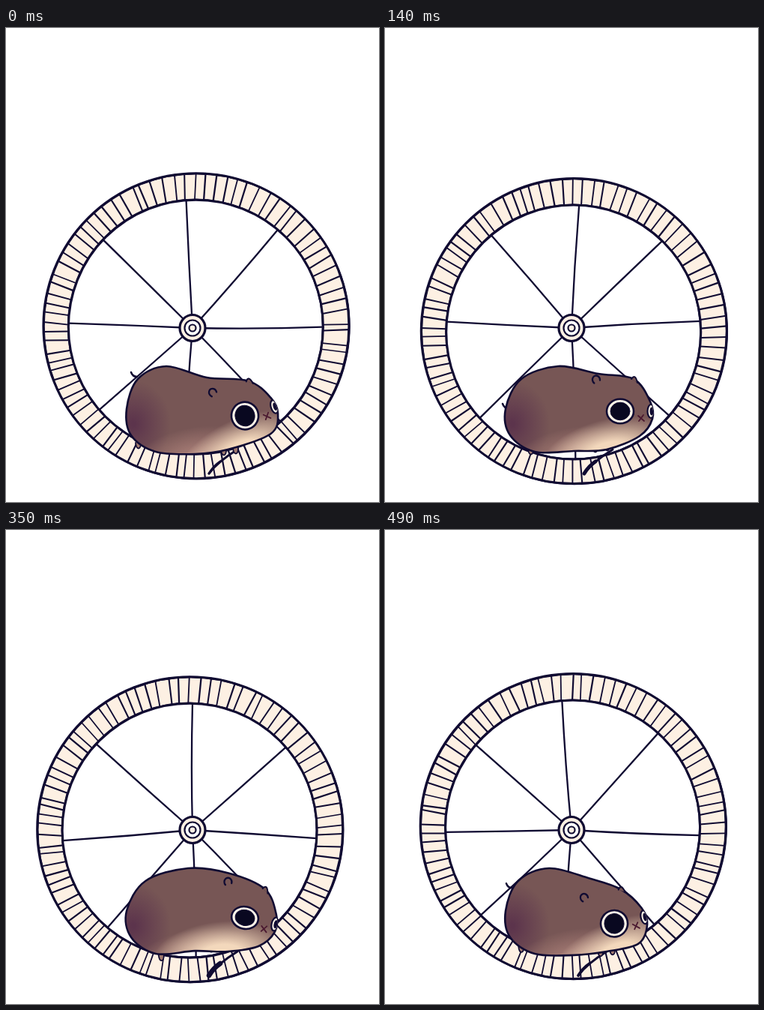
An HTML page with a canvas for the animation above (0.56 s loop, 498 px wide and 632 px high).

```html
<!DOCTYPE html>
<html lang="en">
<head>
<meta charset="utf-8">
<title>Hamster wheel</title>
<style>
  html, body { margin: 0; width: 100%; height: 100%; overflow: hidden; background: #fff; }
  canvas { display: block; }
</style>
</head>
<body>
<canvas id="stage" width="498" height="632"></canvas>
<script>
const ctx = document.getElementById('stage').getContext('2d');
const INK = '#100b32', CREAM = '#fdf0e3', EYE_WHITE = '#fff6e8', FUR = '#775655';
const STEP = 70, STEPS = 8, SLATS = 90, TAU = Math.PI * 2, DEG = Math.PI / 180;

const noise = n => { const s = Math.sin(n * 12.9898) * 43758.5453; return s - Math.floor(s) - .5; };
const onRing = ([cx, cy, rx, ry], a) => [cx + rx * Math.cos(a), cy + ry * Math.sin(a)];

function paint(fill, stroke, width = 2) {
  if (fill) { ctx.fillStyle = fill; ctx.fill(); }
  if (stroke) { ctx.strokeStyle = stroke; ctx.lineWidth = width; ctx.stroke(); }
}
function oval(x, y, rx, ry, turn, fill, stroke, width) {
  ctx.beginPath();
  ctx.ellipse(x, y, rx, ry, turn, 0, TAU);
  paint(fill, stroke, width);
}
function curve(x1, y1, cx, cy, x2, y2, width = 2) {
  ctx.beginPath();
  ctx.moveTo(x1, y1);
  ctx.quadraticCurveTo(cx, cy, x2, y2);
  paint(null, INK, width);
}
function glow(x, y, rx, ry, turn, rgb, solid) {
  ctx.save();
  ctx.translate(x, y);
  ctx.rotate(turn);
  ctx.scale(rx, ry);
  const fade = ctx.createRadialGradient(0, 0, 0, 0, 0, 1);
  fade.addColorStop(solid, `rgb(${rgb})`);
  fade.addColorStop(1, `rgba(${rgb},0)`);
  oval(0, 0, 1, 1, 0, fade);
  ctx.restore();
}
// Closed smooth curve through the points.
function blob(points) {
  const n = points.length, at = i => points[(i + n) % n];
  const path = new Path2D();
  path.moveTo(...at(0));
  for (let i = 0; i < n; i++) {
    const [p, q, r, s] = [at(i - 1), at(i), at(i + 1), at(i + 2)];
    path.bezierCurveTo(q[0] + (r[0] - p[0]) / 6, q[1] + (r[1] - p[1]) / 6,
      r[0] - (s[0] - q[0]) / 6, r[1] - (s[1] - q[1]) / 6, ...r);
  }
  path.closePath();
  return path;
}

// The wheel wobbles once per loop while every spoke sways in its own phase.
function drawWheel(step, phase) {
  const cx = 250 + 4.5 * Math.cos(phase - 30 * DEG);
  const cy = 400 + 5 * Math.cos(phase - 125 * DEG);
  const outer = [cx, cy, 204, 203.5], inner = [cx - .5, cy + 1.5, 170, 169.5];

  oval(...outer, 0, CREAM, INK, 3);
  oval(cx + .6, cy + .5, 204, 203.5, 0, null, INK, 2.4);
  for (let i = 0; i < SLATS; i++) {
    const seed = i + step * 101;
    const a = (i + noise(seed) * .4) / SLATS * TAU + .06 * Math.sin(i / SLATS * TAU + .8);
    const [x1, y1] = onRing(inner, a), [x2, y2] = onRing(outer, a + noise(seed + .5) * .02);
    curve(x1, y1, (x1 + x2) / 2, (y1 + y2) / 2, x2, y2, 2 + noise(seed + .3) * .6);
  }
  oval(...inner, 0, '#fff', INK, 3);
  oval(inner[0] - .5, inner[1] - .5, 170, 169.5, 0, null, INK, 2.2);

  const hx = 249, hy = 400;
  for (let i = 0; i < 8; i++) {
    const sway = 5 * Math.cos(phase + (90 - 40 * i) * DEG);
    const [x, y] = onRing(inner, (45 * i + sway) * DEG);
    const bend = noise(i + step * 7) * .03;
    curve(hx, hy, (hx + x) / 2 + (y - hy) * bend, (hy + y) / 2 - (x - hx) * bend, x, y, 2.3);
  }
  oval(hx, hy, 17, 17.5, 0, CREAM, INK, 3.2);
  oval(hx, hy, 10.5, 10.5, 0, '#fff', INK, 2.2);
  oval(hx, hy, 4.5, 4.5, 0, CREAM, INK, 2.2);
}

// Two lunges per loop, the second shorter: the head falls back, bobbing up midway.
function headPose(step, reach) {
  const first = step < 5;
  const b = first ? step / 4 : (step - 5) / 2, size = first ? 1 : .65;
  return {
    x: 319 - 20 * size * b * b,
    y: 517 + size * (12 * b * b - 36 * b * (1 - b)),
    pitch: -17 * DEG * reach
  };
}

// reach runs from 1 (stretched) to -1 (crouched).
function bodyOutline(head, reach) {
  const c = Math.cos(head.pitch), s = Math.sin(head.pitch);
  const face = [[18, -43], [40, -13], [43, 10], [26, 33]]
    .map(([x, y]) => [head.x + x * c - y * s, head.y + x * s + y * c]);
  return blob([
    [231 - 17 * reach, 451], [285 - 17 * reach, 461 + 5 * reach],
    ...face,
    [296, 562], [252, 564 + 4 * reach], [200, 565], [167, 543], [161, 508], [182 - 6 * reach, 468]
  ]);
}

function drawLimbs(head, reach) {
  const hand = head.x - 48, elbow = head.x - 10;
  curve(hand, 594, head.x - 36, 578, elbow, 562, 3);
  curve(hand, 594, head.x - 42, 584, head.x - 33, 578, 5 - 2 * reach);

  const foreX = 281 + 10 * reach, foreY = 562 + 4 * reach;
  for (const [x, y] of [[195 - 18 * reach, 565 - 8 * reach], [foreX, foreY], [foreX + 16, foreY - 2]]) {
    ctx.beginPath();
    ctx.moveTo(x - 4, y - 4);
    ctx.bezierCurveTo(x - 3, y + 6, x + 3, y + 6, x + 3, y - 4);
    paint('#a07a70', INK, 1.8);
  }
  const tx = 160 + 10 * reach * reach, ty = 504 - 42 * reach;
  curve(tx - 3, ty - 3, tx - 1, ty + 3, tx + 5, ty + 3, 2.5);
}

function drawBody(outline, reach) {
  ctx.save();
  ctx.clip(outline);
  ctx.fillStyle = FUR;
  ctx.fill(outline);
  glow(170, 528, 50, 58, 0, '92,52,76', .05);
  glow(255, 572, 85, 40, -.15, '176,132,124', 0);
  glow(298 + 15 * reach, 566, 92, 44, -.25 - .2 * reach, '243,216,188', .3);
  ctx.restore();
  ctx.strokeStyle = INK;
  ctx.lineWidth = 2.6;
  ctx.stroke(outline);
}

function drawFace(head, outline, reach) {
  const place = () => { ctx.translate(head.x, head.y); ctx.rotate(head.pitch); };

  ctx.save();
  ctx.clip(outline);
  place();
  oval(41, 0, 4.5, 9, 0, EYE_WHITE, INK, 2.2);
  oval(42, 0, 2.5, 5.5, 0, INK);
  ctx.restore();

  ctx.save();
  place();
  const open = 16.3 + 2 * reach;
  oval(0, 0, 18, open, 0, EYE_WHITE, INK, 2.6);
  oval(0, 0, 13, open - 4.5, 0, '#090820', INK, 1);

  ctx.beginPath();
  ctx.moveTo(24, 6); ctx.lineTo(32, 13);
  ctx.moveTo(31, 5); ctx.lineTo(25, 13);
  paint(null, '#4a1930', 1.8);

  ctx.beginPath();
  ctx.ellipse(-32, -42, 5, 5.5, -.2, Math.PI * .75, Math.PI * 2.1);
  paint(null, INK, 2.3);

  ctx.beginPath();
  ctx.moveTo(15, -43);
  ctx.quadraticCurveTo(20, -51, 23, -38);
  paint(FUR, INK, 2);
  ctx.restore();
}

function draw(step) {
  const phase = step / STEPS * TAU, reach = Math.cos(phase);
  const head = headPose(step, reach), outline = bodyOutline(head, reach);
  ctx.clearRect(0, 0, 498, 632);
  drawWheel(step, phase);
  drawLimbs(head, reach);
  drawBody(outline, reach);
  drawFace(head, outline, reach);
}

let start, shown;
function tick(now) {
  start ??= now;
  const step = Math.floor((now - start) / STEP) % STEPS;
  if (step !== shown) draw(shown = step);
  requestAnimationFrame(tick);
}
ctx.lineCap = ctx.lineJoin = 'round';
requestAnimationFrame(tick);
</script>
</body>
</html>
```
